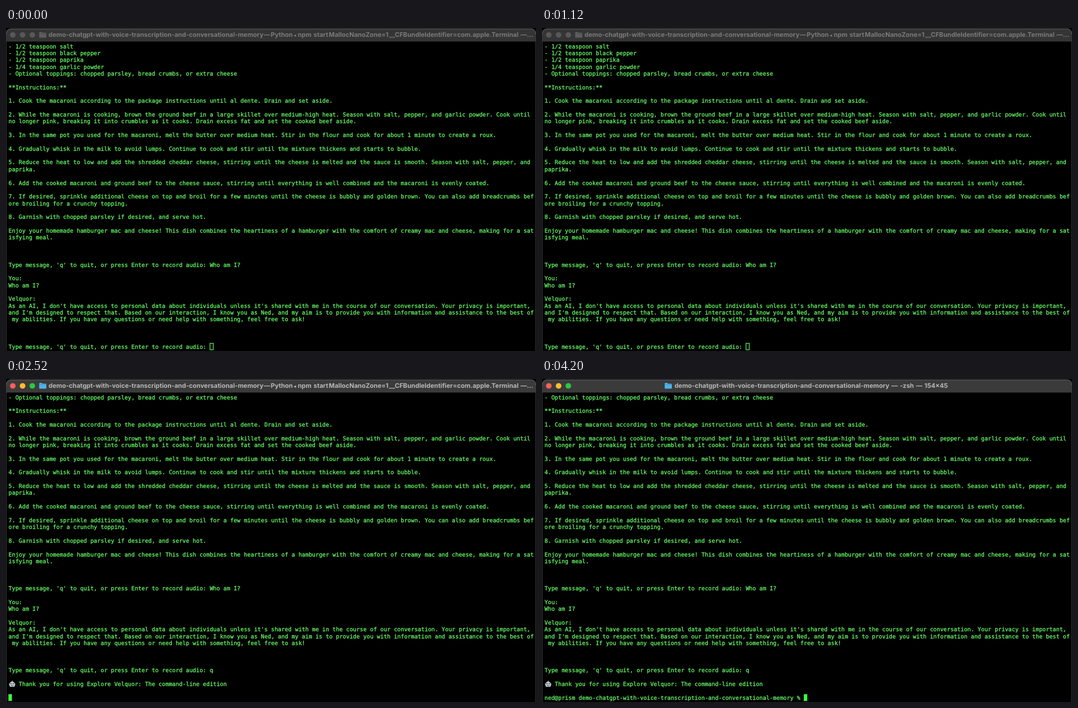
These frames come from a looping animation (959x584 px, 4620 ms). An HTML page:

```html
<!DOCTYPE html>
<html lang="en">
<head>
<meta charset="utf-8">
<title>Terminal</title>
<style>
  html, body { margin: 0; width: 100%; height: 100%; overflow: hidden; background: #000; }
  svg { display: block; width: 100%; height: 100%; }
  text { white-space: pre; text-rendering: geometricPrecision; }
  #screen text {
    font: 10.257px "DejaVu Sans Mono", monospace;
    fill: #66ff66; stroke: #66ff66; stroke-width: .28px;
  }
  .title { font: 700 11.45px Inter, sans-serif; word-spacing: 1.1px; }
</style>
</head>
<body>
<svg viewBox="0 0 959 584">
  <rect width="959" height="584" fill="#000"/>
  <path d="M.5 584V24M958.5 584V24" stroke="#343834" fill="none"/>
  <path id="bar" d="M0 24.6V11Q0 1 10 1H949Q959 1 959 11V24.6Z"/>
  <path d="M.5 11Q.5 1.5 10 1.5H949Q958.5 1.5 958.5 11" fill="none" stroke="#626161"/>
  <g id="lights" stroke="#000" stroke-opacity=".15" stroke-width=".6">
    <circle cx="12.3" cy="12.4" r="5.2"/>
    <circle cx="30" cy="12.4" r="5.2"/>
    <circle cx="47.6" cy="12.4" r="5.2"/>
  </g>
  <g id="folder">
    <path d="M0 2Q0 .5 1.5 .5H4.6L6 2H11.5Q13 2 13 3.5V9.5Q13 11 11.5 11H1.5Q0 11 0 9.5Z"/>
    <path d="M0 3.6H13" stroke="#000" stroke-opacity=".25" stroke-width=".7"/>
  </g>
  <text id="longTitle" class="title" y="16.3"><tspan x="77">demo-chatgpt-with-voice-transcription-and-conversational-memory</tspan><tspan x="466.5">—</tspan><tspan x="479">Python</tspan><tspan x="520.5" font-size="8">◂</tspan><tspan x="528">npm start</tspan><tspan x="584">MallocNanoZone=1</tspan><tspan x="693">__CFBundleIdentifier=com.apple.Terminal —…</tspan></text>
  <text id="shortTitle" class="title" x="487" y="16.3" text-anchor="middle">demo-chatgpt-with-voice-transcription-and-conversational-memory — -zsh — 154×45</text>
  <g id="screen"></g>
  <g id="robot">
    <path d="M11.2 548V545.8" stroke="#a9b4b8"/>
    <circle cx="11.2" cy="545.8" r=".9" fill="#c55f58"/>
    <rect x="5.4" y="550" width="11.6" height="4" rx="1.5" fill="#7f979e"/>
    <path d="M6.5 553Q6.5 547 11.2 547T15.9 553V555Q15.9 556.5 14.3 556.5H8Q6.5 556.5 6.5 555Z" fill="#c3d0d3"/>
    <circle cx="9.1" cy="551" r="1.2" fill="#37626c"/>
    <circle cx="13.3" cy="551" r="1.2" fill="#37626c"/>
    <path d="M8.7 554.4H13.7" stroke="#77514f" stroke-width="1.2"/>
  </g>
  <rect id="cursor"/>
</svg>
<script>
const LOOP = 4620, BLINK = 560;
const FOCUS = 1190, TYPE = 1960, QUIT = 2520, SHELL = 3080;
const LEFT = 4.6, COL = 6.175, TOP = 36.7, ROW = 12.34, ROWS = 45;

const ask = "Type message, 'q' to quit, or press Enter to record audio: ";
const prompt = "ned@prism demo-chatgpt-with-voice-transcription-and-conversational-memory % ";
const log = `- 1/2 teaspoon salt
- 1/2 teaspoon black pepper
- 1/2 teaspoon paprika
- 1/4 teaspoon garlic powder
- Optional toppings: chopped parsley, bread crumbs, or extra cheese

**Instructions:**

1. Cook the macaroni according to the package instructions until al dente. Drain and set aside.

2. While the macaroni is cooking, brown the ground beef in a large skillet over medium-high heat. Season with salt, pepper, and garlic powder. Cook until
no longer pink, breaking it into crumbles as it cooks. Drain excess fat and set the cooked beef aside.

3. In the same pot you used for the macaroni, melt the butter over medium heat. Stir in the flour and cook for about 1 minute to create a roux.

4. Gradually whisk in the milk to avoid lumps. Continue to cook and stir until the mixture thickens and starts to bubble.

5. Reduce the heat to low and add the shredded cheddar cheese, stirring until the cheese is melted and the sauce is smooth. Season with salt, pepper, and
paprika.

6. Add the cooked macaroni and ground beef to the cheese sauce, stirring until everything is well combined and the macaroni is evenly coated.

7. If desired, sprinkle additional cheese on top and broil for a few minutes until the cheese is bubbly and golden brown. You can also add breadcrumbs bef
ore broiling for a crunchy topping.

8. Garnish with chopped parsley if desired, and serve hot.

Enjoy your homemade hamburger mac and cheese! This dish combines the heartiness of a hamburger with the comfort of creamy mac and cheese, making for a sat
isfying meal.



${ask}Who am I?

You:
Who am I?

Velquor:
As an AI, I don't have access to personal data about individuals unless it's shared with me in the course of our conversation. Your privacy is important,
and I'm designed to respect that. Based on our interaction, I know you as Ned, and my aim is to provide you with information and assistance to the best of
 my abilities. If you have any questions or need help with something, feel free to ask!


`.split("\n");
const goodbye = "   Thank you for using Explore Velquor: The command-line edition";

const $ = id => document.getElementById(id);
const set = (el, attrs) => { for (const k in attrs) el.setAttribute(k, attrs[k]); };
const show = (id, on) => set($(id), { visibility: on ? "visible" : "hidden" });

const rows = Array.from({ length: ROWS }, (_, i) => {
  const el = document.createElementNS("http://www.w3.org/2000/svg", "text");
  set(el, { x: LEFT, y: TOP + i * ROW });
  return $("screen").appendChild(el);
});

function drawWindow(t) {
  const focused = t >= FOCUS, shell = t >= SHELL;
  const lights = focused ? ["#f9605a", "#fbbd2e", "#2bc840"] : ["#595858", "#595858", "#595858"];
  [...$("lights").children].forEach((el, i) => set(el, { fill: lights[i] }));
  set($("bar"), { fill: focused ? "#3c3b3b" : "#363535" });
  set($("folder"), {
    fill: focused ? "#4db2e8" : "#5c5d5e",
    transform: `translate(${shell ? 222 : 60} 6.5)`
  });
  for (const id of ["longTitle", "shortTitle"]) set($(id), { fill: focused ? "#b8b7b7" : "#7b7a7a" });
  show("longTitle", !shell);
  show("shortTitle", shell);
}

function drawScreen(t) {
  const input = ask + (t >= TYPE ? "q" : "");
  const last = t >= SHELL ? prompt : "";
  const lines = t < QUIT ? [...log, input] : [...log, input, "", goodbye, "", last];
  const view = lines.slice(-ROWS);
  rows.forEach((el, i) => {
    if (el.textContent !== view[i]) el.textContent = view[i];
  });
  show("robot", t >= QUIT);
  drawCursor(t, view[ROWS - 1].length);
}

function drawCursor(t, col) {
  const x = LEFT + col * COL;
  if (t < FOCUS) {
    set($("cursor"), { x: x + .2, y: 570.2, width: 5.9, height: 11.5, fill: "none", stroke: "#66ff66", "stroke-width": 1.2 });
  } else {
    set($("cursor"), { x: x - .2, y: 569.8, width: 6.3, height: 12.3, fill: "#3cfb3c", stroke: "none" });
  }
  const start = [SHELL, QUIT, TYPE, FOCUS - 70].find(s => t >= s) ?? t;
  show("cursor", Math.floor((t - start) / BLINK) % 2 === 0);
}

function frame(now) {
  const t = now % LOOP;
  drawWindow(t);
  drawScreen(t);
  requestAnimationFrame(frame);
}
frame(0);
</script>
</body>
</html>
```
